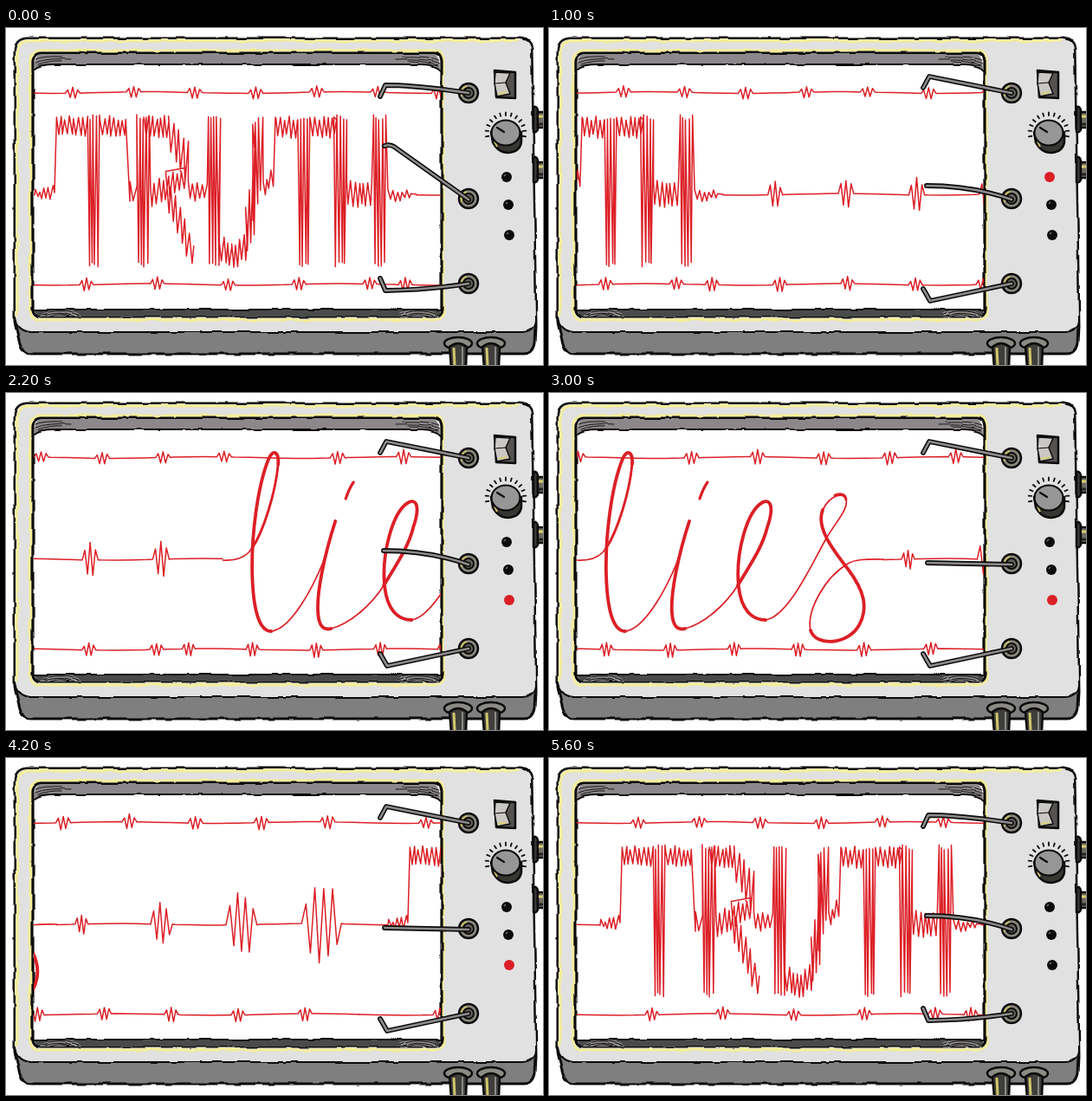
These frames come from a looping animation (620x389 px, 5.7 s). An HTML page:

```html
<!DOCTYPE html>
<html lang="en">
<head>
<meta charset="utf-8">
<title>Polygraph</title>
<style>
  html, body { margin: 0; width: 100%; height: 100%; overflow: hidden; background: #fff; }
  svg { display: block; width: 620px; height: 389px; }
  .ink { stroke: #0c0b0b; stroke-linejoin: round; stroke-linecap: round; }
  .line { fill: none; }
  .red { fill: none; stroke: #dc1f26; stroke-linejoin: round; stroke-linecap: round; }
  .glow { fill: none; stroke: #f5ee98; stroke-width: 3; stroke-linecap: round; }
</style>
</head>
<body>
<svg viewBox="0 0 620 389">
  <defs>
    <clipPath id="screen"><path d="M32 40H502V324H32Z"/></clipPath>
    <filter id="shaky" filterUnits="userSpaceOnUse" x="0" y="0" width="620" height="389" color-interpolation-filters="sRGB">
      <feTurbulence type="fractalNoise" baseFrequency=".05" numOctaves="2" seed="4"/>
      <feDisplacementMap in="SourceGraphic" scale="4" xChannelSelector="R" yChannelSelector="G"/>
    </filter>
    <g id="port">
      <path class="ink" stroke-width="2.5" fill="#3b3a37" d="M609 -15Q613 -16 614 -11V11Q613 15 609 14Z"/>
      <path class="ink" stroke-width="2.5" fill="#6f6c62" d="M614 -9H623V9H614Z"/>
      <path stroke="#d8cf72" stroke-width="3" d="M615 -4H620"/>
      <path stroke="#222" stroke-width="3" d="M615 5H620"/>
    </g>
    <g id="plug">
      <ellipse class="ink" stroke-width="2.5" fill="#8b8a84" cy="364" rx="16" ry="7"/>
      <path class="ink" stroke-width="2.5" fill="#3f3e3b" d="M-10 368Q0 360 10 368L9 392H-8Z"/>
      <path stroke="#cfc66b" stroke-width="3" d="M-5 369L-4 389"/>
      <path stroke="#8a8a88" stroke-width="2" d="M5 368V389"/>
    </g>
    <g id="pivot">
      <circle class="ink" r="11" stroke-width="2.5" fill="#88877b"/>
      <path fill="none" stroke="#c5bd6a" stroke-width="2" d="M-8 4A9 9 0 0 1 -2 -8"/>
      <circle class="ink" r="6" stroke-width="2" fill="#626159"/>
    </g>
  </defs>

  <g filter="url(#shaky)">
    <path class="ink" stroke-width="3" fill="#7f7f7f" d="M24 12H594Q607 13 607 26L612 345L611 364Q609 376 598 376H28Q20 376 16 364L10 340V28Q10 13 24 12Z"/>
    <path class="ink" stroke-width="2" fill="#e1e1e1" d="M24 12H594Q607 13 607 26L612 338Q611 350 597 351H27Q12 349 10 335V28Q10 13 24 12Z"/>
    <path class="glow" d="M13 333V28Q14 16 25 15H592"/>
    <rect class="glow" x="28" y="26" width="477" height="311" rx="11"/>
    <rect class="ink" x="31" y="29" width="472" height="304" rx="9" stroke-width="3.2" fill="#fff"/>
    <path fill="#8c878a" d="M41 30H493Q501 31 501 49Q494 41 480 42H54Q39 42 33 47Q32 31 41 30Z"/>
    <path class="ink line" stroke-width="1.8" d="M33 47Q39 42 54 42H480Q495 42 502 49"/>
    <path class="ink line" stroke-width=".9" d="M34 36Q43 32 66 33M34 40Q47 34 76 36M37 42Q50 37 65 38M500 37Q488 32 457 33M501 41Q489 35 450 36M499 43Q485 38 464 38"/>
    <path fill="#494a4a" d="M33 325H501Q500 333 492 333H42Q34 332 33 325Z"/>
    <path fill="#989594" d="M39 333Q42 325 62 326Q84 326 88 333ZM452 333Q455 325 476 326Q497 326 499 333Z"/>
    <path class="ink line" stroke-width="1.1" d="M40 331Q62 322 86 332M45 332Q62 326 79 333M51 333Q62 329 73 333M453 332Q475 322 498 331M459 333Q476 326 492 332M465 333Q476 329 487 333"/>
    <path class="ink line" stroke-width="2" d="M32 325H502"/>
  </g>

  <g clip-path="url(#screen)"><g id="paper"></g></g>

  <use href="#port" y="106"/><use href="#port" y="164"/>
  <use href="#plug" x="522"/><use href="#plug" x="560"/>
  <use href="#pivot" x="534" y="75"/><use href="#pivot" x="534" y="197"/><use href="#pivot" x="534" y="295"/>
  <g id="pens"></g>

  <path class="ink" stroke-width="2.5" fill="#55534f" d="M564 49L588 51V81L566 80Z"/>
  <path class="ink" stroke-width="1.4" fill="#c9c8c4" d="M565 51L582 52L577 63L582 76L567 79L564 64Z"/>
  <path class="ink line" stroke-width="1.2" d="M564 64L577 63"/>
  <path stroke="#d8cf72" stroke-width="2" d="M568 76L578 74"/>
  <path class="ink line" stroke-width="1.8" id="ticks"/>
  <path class="ink" stroke-width="2.5" fill="#373633" d="M560 120L562 132Q568 144 580 144Q593 143 595 132V120Z"/>
  <path stroke="#c7be68" stroke-width="2" d="M564 131L567 137"/>
  <ellipse class="ink" cx="577" cy="121" rx="16.5" ry="14.5" stroke-width="2.2" fill="#979696"/>
  <path class="ink" stroke-width="2.2" d="M567 115L575 120"/>
  <g id="lamps"></g>
</svg>

<script>
const NS = 'http://www.w3.org/2000/svg';
const $ = id => document.getElementById(id);
const FRAME_MS = 100, FRAMES = 57, STEP = 27.28, LENGTH = 1553.7;
const MIDDLE = 192, TOP = 103, BOTTOM = 273, LIES_X = 818.4;

function add(parent, tag, attrs) {
  const node = document.createElementNS(NS, tag);
  for (const key in attrs) node.setAttribute(key, attrs[key]);
  return parent.appendChild(node);
}

const noise = n => { const s = Math.sin(n * 12.9898) * 43758.5453; return (s - Math.floor(s)) * 2 - 1; };
const mix = (a, b, u) => a + (b - a) * u;
const pt = (x, y) => `L${x.toFixed(1)} ${y.toFixed(1)}`;

// How far the middle trace swings along the paper; the middle pen follows it.
const swings = [];
const mark = (from, to, reach) => swings.push({ from, to, reach });

// Zigzag between an upper and a lower edge, each given at both ends.
function zig(x0, x1, top0, bottom0, top1 = top0, bottom1 = bottom0, pitch = 5) {
  const turns = 2 * Math.round((x1 - x0) / pitch);
  mark(x0, x1, MIDDLE - Math.min(top0, top1));
  let d = '';
  for (let i = 0; i <= turns; i++) {
    const u = i / turns;
    const y = i % 2 ? mix(bottom0, bottom1, u) : mix(top0, top1, u);
    d += pt(mix(x0, x1, u) + .8 * noise(i + x1), y + 3 * noise(x0 + i));
  }
  return d;
}

const bar = (from, to) => zig(from, to, TOP + 1, 125);
const stem = x => zig(x, x + 14, TOP, BOTTOM, TOP, BOTTOM, 3.7);
const letterT = (x, left) => bar(x, x + left) + stem(x + left) + bar(x + left + 15, x + left + 45);
const letterR = x => stem(x) +
  zig(x + 15, x + 57, 182, 206, 160, 184) + zig(x + 34, x + 66, 168, 205, 250, 279) +
  `M${x + 8} ${TOP}` + bar(x + 9, x + 37) + zig(x + 37, x + 59, 102, 140, 132, 184);
const letterU = x => stem(x) + zig(x + 13, x + 28, 236, 264, 252, 277) + zig(x + 28, x + 46, 252, 277, 236, 266) +
  zig(x + 44, x + 55, 205, 262, 155, 235, 4) + zig(x + 51, x + 63, 112, 228, 102, 180, 4);
const letterH = x => stem(x) + zig(x + 14, x + 44, 178, 205) + stem(x + 45);

const truth =
  'M33 193' + zig(34, 54, 188, 194, 182, 195) + pt(56, 190) + letterT(58, 36) + pt(143, 200) +
  zig(144, 151, 180, 198) + letterR(151) + zig(210, 232, 178, 198) + letterU(233) +
  zig(297, 310, 180, 197, 158, 177) + pt(311, TOP) + letterT(311, 26) + letterH(379) +
  zig(441, 468, 184, 201, 191, 194) + pt(474, MIDDLE);

// Evenly spaced bursts whose width and swing grow from the first to the last.
function series(first, last, count, width0, amp0, width1 = width0, amp1 = amp0) {
  return Array.from({ length: count }, (_, i) => {
    const u = i / (count - 1);
    return { x: mix(first, last, u), width: mix(width0, width1, u), amp: mix(amp0, amp1, u) };
  });
}

const topBursts = [...series(77, 852, 12, 17, 6.5), ...series(983, 1517, 8, 17, 8)];
const bottomBursts = [...series(93, 420, 5, 16, 7), ...series(461, 774, 5, 16, 7.5),
  ...series(811, 1106, 5, 15, 8), ...series(1182, 1491, 5, 16, 8)];
const calmBursts = series(534, 779, 4, 17, 15, 19, 21);
const risingBursts = series(1233, 1510, 4, 15, 11, 46, 48);
for (const { x, width, amp } of [...calmBursts, ...risingBursts]) mark(x - width / 2 - 8, x + width / 2 + 8, amp);

function burst({ x, width, amp }, y) {
  const turns = Math.round(4 + width / 9);
  let d = pt(x - width / 2, y);
  for (let i = 1; i < turns; i++) {
    const u = i / turns, size = amp * (.3 + .7 * Math.sin(Math.PI * u)) * (1 + .15 * noise(x + i));
    d += pt(x + width * (u - .5), y + (i % 2 ? -size : size));
  }
  return d + pt(x + width / 2, y);
}

function trace(from, to, y, bursts) {
  const level = x => y + .9 * Math.sin(x * 14 * Math.PI / LENGTH);
  let x = from, d = `M${from} ${level(from)}`;
  const run = end => { for (; x < end; x += 18) d += pt(x, level(x)); };
  for (const b of bursts) {
    run(b.x - b.width / 2);
    d += burst(b, level(b.x));
    x = b.x + b.width / 2 + 3;
  }
  run(to);
  return d + pt(to, level(to));
}

// Handwriting: a thin running stroke plus heavier overlays.
const lStroke = 'M96 82C97 68 90 64 85 76C72 108 65 165 66 208C67 250 74 275 88 275';
const iStroke = 'M162 148C150 185 140 230 142 254C143 270 149 274 157 272';
const eStroke = 'M218 222C235 194 247 176 252 155C260 132 256 122 247 126C228 136 215 186 219 224C222 250 234 262 250 262';
const sStroke = 'M316 135C308 155 327 180 345 203C364 228 369 248 358 268C345 291 308 293 302 274';
const follow = stroke => stroke.slice(stroke.indexOf('C'));
const lies =
  'M32 193C48 194 56 190 62 184C76 167 93 118 96 82' + follow(lStroke) +
  'C112 272 137 222 148 195L162 148' + follow(iStroke) +
  'C180 266 204 244 218 222' + follow(eStroke) +
  'C276 258 302 200 320 168C331 149 346 134 343 123C340 114 325 117 316 135' + follow(sStroke) +
  'C297 252 318 213 345 197C355 191 370 192 386 192';
mark(LIES_X + 60, LIES_X + 365, 20);

function drawPaper(parent) {
  const red = (group, d, width) => add(group, 'path', { class: 'red', d, 'stroke-width': width });
  red(parent, trace(0, LENGTH, 74.5, topBursts), 1.5);
  red(parent, trace(0, LENGTH, 296, bottomBursts), 1.5);
  red(parent, trace(474, 850, MIDDLE, calmBursts), 1.5);
  red(parent, trace(1204, LENGTH + 33, MIDDLE, risingBursts), 1.5);
  red(parent, truth, 1.5);
  const script = add(parent, 'g', { transform: `translate(${LIES_X} 0)` });
  red(script, lies, 1.7);
  for (const d of [lStroke, iStroke, eStroke, sStroke]) red(script, d, 3.8);
  red(script, 'M66 179C79 160 93 115 96 82M330 118Q342 114 343 123', 2.8);
  red(script, 'M183 103Q178 110 174 122', 3.2);
}

const paper = $('paper');
for (const offset of [0, LENGTH]) drawPaper(add(paper, 'g', { transform: `translate(${offset} 0)` }));

const pens = [0, 1, 2].map(() => [['#0c0b0b', 5.8], ['#8d8c8b', 2.6]].map(([stroke, width]) =>
  add($('pens'), 'path', { fill: 'none', stroke, 'stroke-width': width, 'stroke-linejoin': 'round', 'stroke-linecap': 'round' })));
const setPen = (i, d) => pens[i].forEach(p => p.setAttribute('d', d));

const lamps = [[578, 172], [580, 204], [581, 239]].map(([cx, cy]) => ({
  lamp: add($('lamps'), 'circle', { cx, cy, r: 6 }),
  shine: add($('lamps'), 'path', { d: `M${cx - 3} ${cy - 1}l2 -2`, stroke: '#777', 'stroke-width': 1.2 })
}));

let ticks = '';
for (let i = 0; i < 13; i++) {
  const a = Math.PI * mix(.94, 2.06, i / 12);
  const at = r => `${577 + r * Math.cos(a)} ${121 + r * Math.sin(a)}`;
  ticks += `M${at(20)}L${at(23.5)}`;
}
$('ticks').setAttribute('d', ticks);

function middlePen(x) {
  const reach = Math.max(0, ...swings.filter(s => x >= s.from && x <= s.to).map(s => s.reach));
  if (reach > 60) return 'M437 136Q443 134 448 137L534 198';
  if (reach > 12) return 'M436 182Q489 182 534 198';
  return 'M437 196L534 198';
}

function activeLamp(frame) {
  if (frame >= 44 || frame < 11) return 0;
  return frame < 18 ? 1 : 2;
}

function render(ms) {
  const frame = Math.floor(ms / FRAME_MS) % FRAMES;
  const spread = frame % 4 >= 2;
  paper.setAttribute('transform', `translate(${-frame * STEP} 0)`);
  setPen(0, spread ? 'M432 69L439 56L534 75' : 'M432 79L438 66Q475 66 534 75');
  setPen(1, middlePen((436 + frame * STEP) % LENGTH));
  setPen(2, spread ? 'M432 301L440 315L534 295' : 'M432 289L438 303Q490 302 534 295');
  lamps.forEach(({ lamp, shine }, i) => {
    const lit = spread && i === activeLamp(frame);
    lamp.setAttribute('fill', lit ? '#dc1f26' : '#0c0b0b');
    shine.setAttribute('visibility', lit ? 'hidden' : 'visible');
  });
}

const start = performance.now();
function tick() {
  render(performance.now() - start);
  requestAnimationFrame(tick);
}
tick();
</script>
</body>
</html>
```
